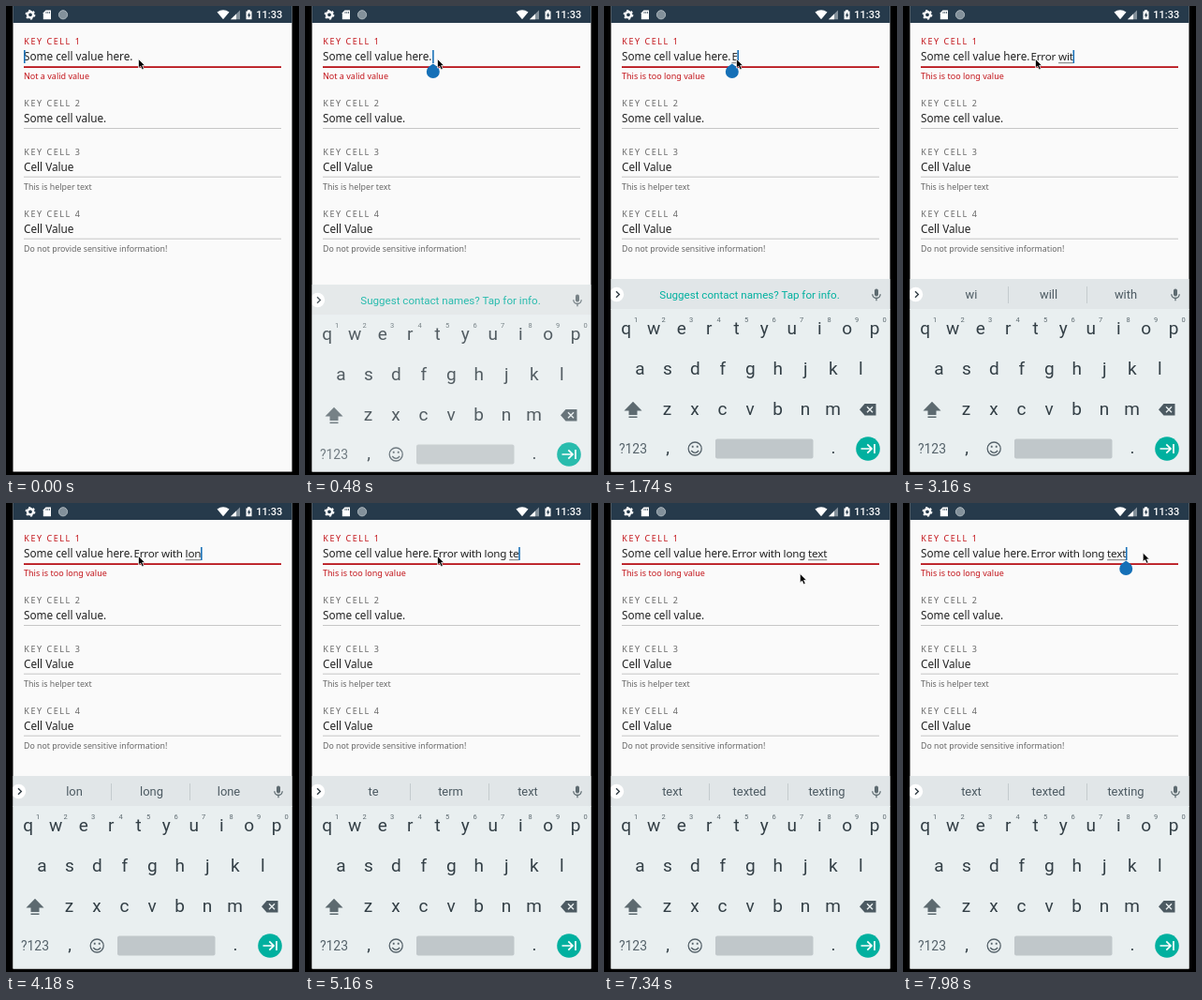
Write an HTML page that moves like this. It is 313x500 px and loops after 8000 ms.

```html
<!DOCTYPE html>
<html lang="en">
<head>
<meta charset="utf-8">
<title>Text field demo</title>
<style>
  html, body { margin: 0; width: 100%; height: 100%; overflow: hidden; background: #000; }
  svg { display: block; width: 100%; height: 100%; }
  text { white-space: pre; }
  .form { font-family: "Noto Sans", sans-serif; }
  .label { font-size: 9px; letter-spacing: 1.55px; fill: #686868; }
  .value { font-size: 11.75px; fill: #222; }
  .typed { font-size: 11.65px; letter-spacing: -.19px; fill: #222; }
  .help { font-size: 8.8px; fill: #666; }
  .error { fill: #c3151b; }
  .keys { font-family: Roboto, sans-serif; fill: #333f46; text-anchor: middle; }
  .key { font-size: 19px; }
  .digit { font-size: 7.5px; fill: #5d6a70; }
  .word { font-size: 12.9px; fill: #4c5a62; }
</style>
</head>
<body>
<svg viewBox="0 0 313 500" preserveAspectRatio="none">
  <defs>
    <clipPath id="screen"><rect x="7.5" width="298" height="496.5"/></clipPath>
  </defs>
  <rect width="313" height="500"/>
  <g clip-path="url(#screen)">
    <rect width="313" height="500" fill="#fafafa"/>
    <g id="status">
      <rect width="313" height="18" fill="#263a4b"/>
      <circle cx="26" cy="9.3" r="3.1" fill="none" stroke="#fff" stroke-width="2.4"/>
      <circle cx="26" cy="9.3" r="4.7" fill="none" stroke="#fff" stroke-width="1.4" stroke-dasharray="2.2 2.722"/>
      <path d="M42.5 4.5H48V14.3H39.8V7.2Z" fill="#fff"/>
      <path d="M43 6v2M44.8 6v2M46.5 6v2" stroke="#263a4b" stroke-width=".7"/>
      <circle cx="61" cy="9.3" r="4.6" fill="#83919b" stroke="#a9b4bb"/>
      <path d="M225.5 6.6Q232 2 238.5 6.6L232 14.3Z" fill="#fff"/>
      <path d="M240 14.3L250 4.5V14.3Z" fill="#84919b"/>
      <path d="M240 14.3L246 8.4V14.3Z" fill="#fff"/>
      <path d="M256.5 5.5H258V4.3H261V5.5H262.5V14.3H256.5Z" fill="#fff"/>
      <path d="M260.2 6.6L257.8 10.4H259.3V13L261.4 9.3H260.2Z" fill="#263a4b"/>
      <text x="267.3" y="13.3" font-family="Roboto, sans-serif" font-size="11" font-weight="500" fill="#fff">11:33</text>
    </g>
    <g id="form" class="form">
      <text id="typed" class="typed" x="136.4" y="58"></text>
      <path id="compose" stroke="#555" stroke-width=".8"/>
    </g>
    <rect id="caret" y="47" width="1.6" height="14" fill="#1b72b8"/>
    <path id="handle" d="M0 61.5L4.8 65A7 7 0 1 1 -4.8 65Z" fill="#1570b7"/>
    <g id="board" class="keys">
      <rect y="291" width="313" height="33" fill="#e1e6e8"/>
      <rect y="323" width="313" height="177" fill="#e9eff0"/>
      <circle cx="13.5" cy="307.5" r="7.7" fill="#fff"/>
      <path d="M13 304.2L16.3 307.5L13 310.8" fill="none" stroke="#333f46" stroke-width="1.4"/>
      <text id="prompt" x="155.5" y="312" font-size="11.6" style="fill:#00b09f">Suggest contact names? Tap for info.</text>
      <g id="words"><path d="M112.5 299v18M196.5 299v18" stroke="#c4cbce"/></g>
      <g stroke="#5d6a70" fill="none" stroke-width="1.3">
        <path d="M291 303.5v4" stroke-width="4" stroke-linecap="round"/>
        <path d="M286.8 307.3a4.2 4.2 0 0 0 8.4 0M291 311.5v2.7"/>
      </g>
      <path d="M31 421.7L40.5 431.5H35.5V436H26.5V431.5H21.5Z" fill="#5d6a70"/>
      <path d="M26.5 438.3h9" stroke="#5d6a70" stroke-width="1.6"/>
      <path d="M278.5 424H290.5V436.5H278.5L273 430.2Z" fill="#4c5a62"/>
      <path d="M281 427.2l6 6m0-6l-6 6" stroke="#e9eff0" stroke-width="1.4"/>
      <text x="31" y="476.7" font-size="13.9" style="fill:#55626a">?123</text>
      <text class="key" x="68" y="477">,</text>
      <text class="key" x="245" y="477">.</text>
      <g fill="none" stroke="#55626a" stroke-width="1.3">
        <circle cx="97.2" cy="472" r="7"/>
        <path d="M93.2 474q4 4.6 8 0"/>
        <path d="M94.7 468.7v2M99.7 468.7v2" stroke-width="1.8"/>
      </g>
      <rect x="119" y="461.5" width="104.5" height="21" rx="2" fill="#c0c7ca"/>
      <circle cx="282" cy="472" r="12.8" fill="#00b09f"/>
      <path d="M274.5 472H285.5M281.3 467.3L286 472L281.3 476.7M289 467V477" fill="none" stroke="#fff" stroke-width="1.7"/>
    </g>
  </g>
  <path id="mouse" d="M0 0V9.6L2.2 7.6L3.9 11.3L5.8 10.4L4.1 6.9H7Z" stroke="#fff" stroke-width=".7"/>
</svg>
<script>
const LOOP = 8000;
const el = id => document.getElementById(id);

function add(parent, tag, attrs, content = "") {
  const node = document.createElementNS("http://www.w3.org/2000/svg", tag);
  for (const key in attrs) node.setAttribute(key, attrs[key]);
  node.textContent = content;
  parent.prepend(node);
  return node;
}

// One cell: top is the label's baseline
function cell(n, top, value, help, red) {
  const form = el("form"), tint = red ? " error" : "";
  add(form, "text", { class: "label" + tint, x: 19.3, y: top }, "KEY CELL " + n);
  add(form, "text", { class: "value", x: 19, y: top + 17 }, value);
  add(form, "rect", {
    x: 19, y: top + (red ? 23.2 : 23), width: 275, height: red ? 1.8 : 1,
    fill: red ? "#b8141b" : "#c6c6c6"
  });
  return add(form, "text", { class: "help" + tint, x: 19, y: top + 37 }, help);
}

const error = cell(1, 41, "Some cell value here.", "", true);
cell(2, 107, "Some cell value.", "");
cell(3, 158.7, "Cell Value", "This is helper text");
cell(4, 224.7, "Cell Value", "Do not provide sensitive information!");
error.style.fontSize = "9px";

// Keyboard letters
const rows = [["qwertyuiop", 23.7, 350], ["asdfghjkl", 38.3, 393], ["zxcvbnm", 67.5, 436]];
rows.forEach(([letters, left, y], row) => {
  [...letters].forEach((ch, i) => {
    const x = left + i * 29.5;
    el("board").append(add(el("board"), "text", { class: "key", x, y }, ch));
    if (!row) el("board").append(add(el("board"), "text", { class: "digit", x: x + 10.3, y: 336.5 }, (i + 1) % 10));
  });
});
const words = [73, 155.5, 238].map(x => add(el("words"), "text", { class: "word", x, y: 312 }));

// Moments at which each next character lands
const phrase = "Error with long text";
const strokes = [1740, 1980, 2140, 2300, 2400, 2460, 2660, 2900, 3160, 3260,
  3520, 3640, 3760, 4180, 4720, 4820, 5020, 5140, 5280, 5380];

const hints = [
  [2660, "w|was|with"], [2960, "wi|will|with"], [3300, "with|within|without"],
  [3540, "the|a|you"], [3660, "l|like|long"], [3760, "lo|look|long"],
  [4180, "lon|long|lone"], [4740, "long|longer|longest"], [4860, "time|term|enough"],
  [5040, "t|the|to"], [5160, "te|term|text"], [5300, "tex|text|texts"],
  [5380, "text|texted|texting"]
];

const caretOff = [[760, 1260], [6080, 6580], [7080, 7580]];

const path = [[5740, 141.5, 56.5], [6400, 127.8, 114.3], [6880, 127.8, 114.3], [7660, 256.3, 53]];

const clamp = v => Math.min(1, Math.max(0, v));
const part = (t, from, to) => clamp((t - from) / (to - from));
const smooth = p => p * p * (3 - 2 * p);

function mouseAt(t) {
  let [, x, y] = path[0];
  for (let i = 1; i < path.length; i++) {
    const p = smooth(part(t, path[i - 1][0], path[i][0]));
    x += (path[i][1] - path[i - 1][1]) * p;
    y += (path[i][2] - path[i - 1][2]) * p;
  }
  return [x, y];
}

function drawText(t) {
  const text = phrase.slice(0, strokes.filter(s => s <= t).length);
  const typed = el("typed");
  typed.textContent = text;
  const end = 136.4 + (text ? typed.getComputedTextLength() : 0);

  const start = text.lastIndexOf(" ") + 1;
  const open = start < text.length;
  if (open) {
    const from = 136.4 + (start ? typed.getSubStringLength(0, start) : 0);
    el("compose").setAttribute("d", `M${from} 60.7H${end}`);
  }
  el("compose").style.display = open ? "" : "none";

  el("caret").setAttribute("x", t < 100 ? 19 : end - .3);
  el("caret").style.display = caretOff.some(([a, b]) => t >= a && t < b) ? "none" : "";
  error.textContent = t < 1740 ? "Not a valid value" : "This is too long value";

  const late = t >= 7820;
  el("handle").setAttribute("transform", `translate(${late ? end : 136.8} 0)`);
  el("handle").setAttribute("opacity",
    late ? part(t, 7800, 7960) : part(t, 280, 360) * (1 - part(t, 1745, 1985)));
}

function drawBoard(t) {
  const left = 1 - part(t, 300, 760);
  el("board").setAttribute("transform", `translate(0 ${20 * left ** 2.4})`);
  el("board").setAttribute("opacity", 1 - left ** 3.6);

  const hint = hints.filter(h => h[0] <= t).pop();
  el("prompt").style.display = hint ? "none" : "";
  el("words").style.display = hint ? "" : "none";
  if (hint) hint[1].split("|").forEach((word, i) => { words[i].textContent = word; });
}

function draw(t) {
  drawText(t);
  drawBoard(t);
  el("mouse").setAttribute("transform", `translate(${mouseAt(t)})`);
}

const began = performance.now();
function tick() {
  draw((performance.now() - began) % LOOP);
  requestAnimationFrame(tick);
}
tick();
</script>
</body>
</html>
```
